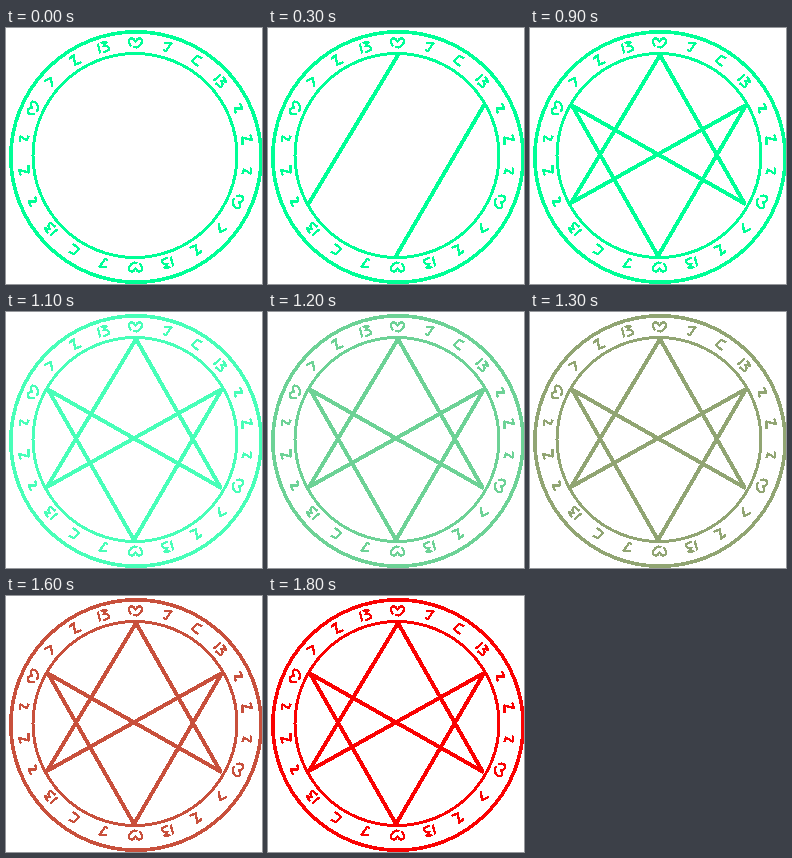
Recreate the animation shown at these times as an HTML page. Size 256 by 256 pixels, loop 1900 ms.

```html
<!DOCTYPE html>
<html>
<head>
<meta charset="utf-8">
<style>
html, body { margin: 0; width: 100%; height: 100%; overflow: hidden; background: #fff; }
svg { display: block; width: 256px; height: 256px; fill: none; shape-rendering: crispEdges; }
</style>
</head>
<body>
<svg viewBox="0 0 256 256" stroke="#00ff96">
  <circle cx="130" cy="129" r="125.2" stroke-width="3.6"/>
  <circle cx="129" cy="127.5" r="102" stroke-width="3"/>
  <g id="runes" stroke-width="2.3" stroke-linejoin="round"></g>
  <g id="star" stroke-width="4" stroke-linecap="round"></g>
</svg>
<script>
const STEP = 100, STEPS = 19;
const svg = document.querySelector('svg');

function add(parent, tag, attrs) {
  const el = document.createElementNS('http://www.w3.org/2000/svg', tag);
  for (const k in attrs) el.setAttribute(k, attrs[k]);
  return document.getElementById(parent).appendChild(el);
}

// Eleven signs, outward side up, repeated twice around the ring
const wave = 'M-4 4Q-8 0-6-3Q-3-6 0-1Q3-6 6-3Q8 2 1 5L-2 4';
const seven = 'M-4-5L3-2L-3 5';
const zed = 'M-4-4L2-5L-2 4L5 5';
const bee = 'M-5-5V5M-2-5L4-4L0-1Q6 0 4 4L-2 5';
const hook = 'M-4-4L2-4L-1 3L4 4';
const signs = [wave, 'M-4-3L3-5L0 4L-3 4', 'M4-5L-2-4L-3 3L5 4',
  bee, hook, zed, hook, wave, seven, zed, bee];
for (let i = 0; i < 22; i++) {
  add('runes', 'path', {
    d: signs[i % 11],
    transform: `translate(129.5 127) rotate(${i * 360 / 22}) translate(0 -112.5)`
  });
}

const apex = [130, 27], base = [128, 228];
const tl = [42, 77.5], tr = [216, 77], bl = [41, 175], br = [214.5, 175.5];
// Two edges at a time, three steps for each pair
const edges = [
  [apex, bl], [base, tr],
  [bl, tr], [tl, br],
  [br, apex], [tl, base]
].map(([a, b], i) => ({
  a, b, start: 3 * (i >> 1),
  el: add('star', 'line', { x1: a[0], y1: a[1] })
}));

// step, red, green, blue
const tones = [
  [0, 0, 255, 150], [9, 0, 255, 150], [11, 72, 255, 184],
  [13, 145, 165, 115], [16, 200, 80, 60], [18, 250, 2, 2]
];

function tone(n) {
  const i = Math.max(1, tones.findIndex(k => k[0] >= n));
  const p = tones[i - 1], q = tones[i];
  const f = (n - p[0]) / (q[0] - p[0]);
  return `rgb(${[1, 2, 3].map(c => Math.round(p[c] + (q[c] - p[c]) * f))})`;
}

function draw(n) {
  svg.setAttribute('stroke', tone(n));
  for (const { a, b, start, el } of edges) {
    const f = Math.min(1, Math.max(0, (n - start) / 3));
    el.setAttribute('visibility', f ? 'visible' : 'hidden');
    el.setAttribute('x2', a[0] + (b[0] - a[0]) * f);
    el.setAttribute('y2', a[1] + (b[1] - a[1]) * f);
  }
}

const t0 = performance.now();
function tick() {
  draw(Math.floor(Math.max(0, performance.now() - t0) / STEP) % STEPS);
  requestAnimationFrame(tick);
}
tick();
</script>
</body>
</html>
```
